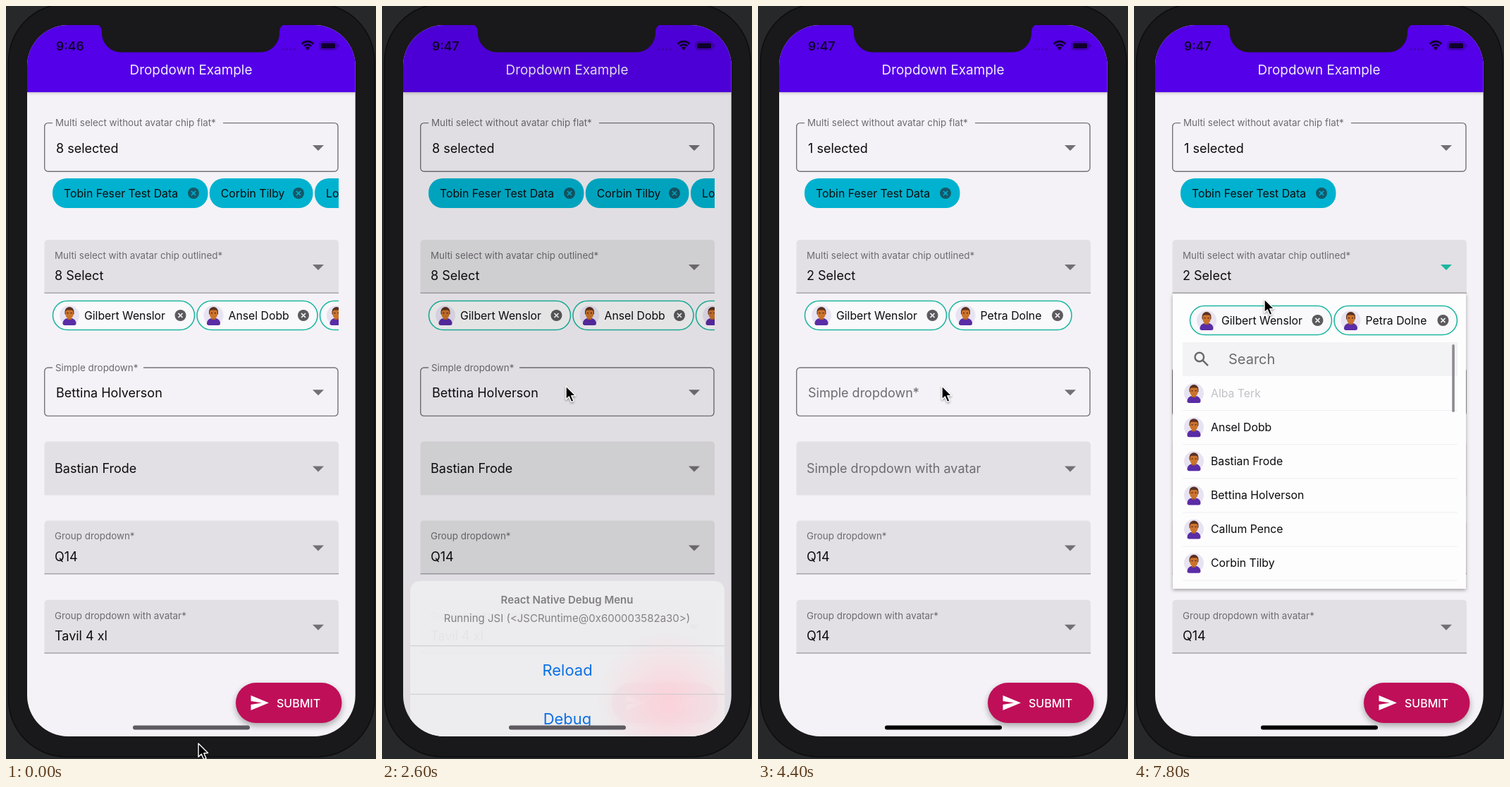
Recreate the animation shown at these times as an HTML page with a canvas. Size 525x1066 px, loop 8000 ms.

```html
<!DOCTYPE html>
<html lang="en">
<head>
<meta charset="utf-8">
<title>Dropdown Example</title>
<style>
html, body { margin: 0; width: 100%; height: 100%; overflow: hidden; background: #1f2022; }
canvas { display: block; width: 525px; height: 1066px; }
</style>
</head>
<body>
<canvas id="stage"></canvas>
<script>
const W = 525, H = 1066, LOOP = 8000, STEP = 200;
const canvas = document.getElementById('stage');
const ratio = window.devicePixelRatio || 1;
canvas.width = W * ratio;
canvas.height = H * ratio;
const c = canvas.getContext('2d');

const INK = '#0c0b0d', MUTED = '#6d6b70', FIELD = '#e2e0e4', PAGE = '#f4f2f6';
const TEAL = '#1db7a1', CYAN = '#00b2cf', BLUE = '#0a70e6', PURPLE = '#5400e8';
const PEOPLE = ['Alba Terk', 'Ansel Dobb', 'Bastian Frode', 'Bettina Holverson', 'Callum Pence', 'Corbin Tilby'];
const ACTIONS = ['Reload', 'Debug', 'Show Inspector', 'Disable Fast Refresh', 'Configure Bundler', 'Show Perf Monitor'];

// Each key: [time, value, value...]
const POINTER = [[0, 273, 1044], [1200, 273, 1044], [1400, 274, 994], [1800, 274, 757], [2200, 261, 538],
  [5400, 261, 538], [6200, 199, 490], [6600, 199, 490], [7400, 185, 376], [7600, 185, 376], [7800, 185, 415]];
const SHEET = [[1200, 640], [1400, 421], [1600, 40], [1800, 0], [2400, 0], [2600, 400], [2800, 640]];

function track(keys, t) {
  let i = keys.findIndex(k => k[0] > t);
  if (i === 0) return keys[0].slice(1);
  if (i < 0) return keys[keys.length - 1].slice(1);
  const a = keys[i - 1], b = keys[i], p = (t - a[0]) / (b[0] - a[0]);
  return a.slice(1).map((v, n) => v + (b[n + 1] - v) * p);
}

function box(x, y, w, h, r, fill, stroke, line = 1.4) {
  c.beginPath();
  c.roundRect(x, y, w, h, r);
  if (fill) { c.fillStyle = fill; c.fill(); }
  if (stroke) { c.strokeStyle = stroke; c.lineWidth = line; c.stroke(); }
}

function rect(x, y, w, h, fill) {
  c.fillStyle = fill;
  c.fillRect(x, y, w, h);
}

function disc(x, y, r, fill) {
  c.fillStyle = fill;
  c.beginPath();
  c.arc(x, y, r, 0, Math.PI * 2);
  c.fill();
}

function poly(points, fill) {
  c.beginPath();
  points.forEach(([x, y]) => c.lineTo(x, y));
  c.closePath();
  c.fillStyle = fill;
  c.fill();
}

// y is the middle of the capitals
function text(s, x, y, size, color = INK, weight = 400, align = 'left') {
  c.font = `${weight} ${size}px Inter, sans-serif`;
  c.textAlign = align;
  c.fillStyle = color;
  c.fillText(s, x, y + size * 0.36);
}

function shadow(color, blur, y, draw) {
  c.save();
  c.shadowColor = color;
  c.shadowBlur = blur * ratio;
  c.shadowOffsetY = y * ratio;
  draw();
  c.restore();
}

function clipped(x, y, w, h, r, draw) {
  c.save();
  c.beginPath();
  c.roundRect(x, y, w, h, r);
  c.clip();
  draw();
  c.restore();
}

function caret(y, color = '#727075') {
  poly([[435, y - 4], [451, y - 4], [443, y + 4]], color);
}

function cross(x, y, fill, mark) {
  disc(x, y, 8, fill);
  c.strokeStyle = mark;
  c.lineWidth = 1.7;
  c.beginPath();
  c.moveTo(x - 3, y - 3); c.lineTo(x + 3, y + 3);
  c.moveTo(x + 3, y - 3); c.lineTo(x - 3, y + 3);
  c.stroke();
}

function avatar(x, y) {
  disc(x, y, 14, '#e7e3f1');
  box(x - 9.5, y + 4, 19, 10, [8, 8, 3, 3], '#5a2ca6');
  rect(x - 3, y, 6, 6, '#b35f22');
  box(x - 6.5, y - 12, 13, 11, [7, 7, 2, 2], '#5a3022');
  box(x - 5.5, y - 7.5, 11, 12, [3, 3, 6, 6], '#cb732c');
  rect(x - 3.5, y - 4, 2, 1.3, '#4b2618');
  rect(x + 1.5, y - 4, 2, 1.3, '#4b2618');
}

function flatChip(x, w, name) {
  box(x, 244, w, 42, 20, CYAN);
  text(name, x + 16, 265, 15.8);
  cross(x + w - 20.5, 265, '#13596a', CYAN);
}

function lineChip(x, y, w, name) {
  box(x, y - 20.5, w, 41, 20.5, '#f9f8fa', TEAL, 1.6);
  avatar(x + 23.5, y);
  text(name, x + 44.5, y, 15.8);
  cross(x + w - 20, y, '#5c5a5e', '#f9f8fa');
}

function outlined(y, h, label, value, gap, caretColor) {
  box(54.7, y, 416.3, h, 5, null, '#757378');
  if (value) {
    rect(66, y - 2, gap, 4, PAGE);
    text(label, 70, y, 13.4, MUTED);
  }
  text(value || label, 71, y + h / 2 + 1.5, 18, value ? INK : MUTED);
  caret(y + h / 2 + 1, caretColor);
}

function filled(y, label, value, caretColor) {
  box(54.5, y, 417.5, 76, [5, 5, 0, 0], FIELD);
  if (label) {
    rect(54.5, y + 74.6, 417.5, 1.4, '#a4a2a7');
    text(label, 69, y + 22, 13.4, MUTED);
    text(value, 69, y + 51, 18);
  }
  caret(y + 39, caretColor);
}

function statusBar(late) {
  const ink = '#10002e';
  text(late ? '9:47' : '9:46', 71, 57, 17.5, ink, 600);
  for (let i = 0; i < 4; i++) rect(392 + i * 5.2, 60.5, 2.6, 1.6, '#3a009f');
  c.strokeStyle = ink;
  c.lineWidth = 2.8;
  for (const r of [7.4, 11.8]) {
    c.beginPath();
    c.arc(428, 62, r, -Math.PI * 0.75, -Math.PI * 0.25);
    c.stroke();
  }
  poly([[428, 63], [424.6, 58.8], [428, 57.4], [431.4, 58.8]], ink);
  box(445, 50.6, 24, 11.4, 3.5, null, '#35008e', 1);
  box(446.8, 52.4, 20.4, 7.8, 2, ink);
  rect(470.3, 54.3, 1.4, 4, '#35008e');
}

function submit() {
  shadow('rgba(0,0,0,.32)', 9, 4, () => box(326, 958, 150.5, 57, 28.5, '#bf0f58'));
  poly([[347.5, 976], [373, 986.5], [347.5, 997], [347.5, 989], [363, 986.5], [347.5, 984]], '#fff');
  text('SUBMIT', 384, 987, 16, '#fff', 500);
}

function form(reset, openSimple, openMulti) {
  outlined(165.6, 68.6, 'Multi select without avatar chip flat*', reset ? '1 selected' : '8 selected', 242);
  filled(331, 'Multi select with avatar chip outlined*', reset ? '2 Select' : '8 Select', openMulti ? TEAL : undefined);
  clipped(54, 240, 418, 230, 0, () => {
    flatChip(66, 220.5, 'Tobin Feser Test Data');
    lineChip(66.5, 438, 201, 'Gilbert Wenslor');
    if (reset) {
      lineChip(271, 438, 174, 'Petra Dolne');
    } else {
      flatChip(288.8, 146.7, PEOPLE[5]);
      flatChip(438, 150, 'Lorna');
      lineChip(271, 438, 171, PEOPLE[1]);
      lineChip(445.5, 438, 170, 'Lorna');
    }
  });
  outlined(512, 68.4, 'Simple dropdown*', reset ? '' : PEOPLE[3], 129, openSimple ? '#4a2ff0' : undefined);
  filled(616.5);
  text(reset ? 'Simple dropdown with avatar' : PEOPLE[2], 69, 655, 18, reset ? MUTED : INK);
  filled(728.5, 'Group dropdown*', 'Q14');
  filled(840.7, 'Group dropdown with avatar*', reset ? 'Q14' : 'Tavil 4 xl');
  submit();
}

function list(top, bottom, searchY, withAvatar, barHeight) {
  shadow('rgba(0,0,0,.35)', 5, 2, () => rect(55, top, 416, bottom - top, '#fefdfe'));
  if (withAvatar) {
    lineChip(79.5, 445, 201, 'Gilbert Wenslor');
    lineChip(284, 445, 174.5, 'Petra Dolne');
  }
  rect(69, searchY - 24, 390, 48, '#f3f2f4');
  c.strokeStyle = '#69676c';
  c.lineWidth = 2.4;
  c.beginPath();
  c.arc(92.8, searchY - 3, 6.3, 0, Math.PI * 2);
  c.moveTo(97.5, searchY + 1.7);
  c.lineTo(105, searchY + 9.2);
  c.stroke();
  text('Search', 134, searchY, 20, MUTED);
  const rows = withAvatar ? 6 : 5;
  for (let i = 0; i < rows; i++) {
    const y = searchY + 48 + i * 48.15;
    if (withAvatar) avatar(85, y);
    const color = i ? INK : withAvatar ? '#c3c1c5' : '#7b797e';
    text(PEOPLE[i], withAvatar ? 109 : 73.5, y, 15.8, color);
    if (withAvatar || i < rows - 1) rect(69, y + 24, 390, 1, '#eeedf0');
  }
  box(451.3, searchY - 21, 3.6, barHeight, 1.8, '#8d8b90');
}

function openList(t, from, to, draw) {
  if (t < from || t >= to) return;
  c.save();
  if (t < from + STEP) {
    c.globalAlpha = 0.8;
    c.translate(0, 37);
  }
  draw();
  c.restore();
}

function actionSheet(off) {
  rect(30, 27, 466, 1008, `rgba(0,0,0,${0.22 * (1 - off / 640)})`);
  const top = 414 + off;
  clipped(40, top, 446, 502, 14, () => {
    rect(40, top, 446, 502, 'rgba(238,237,239,.96)');
    if (off > 0) {
      const glow = c.createRadialGradient(405, 985, 10, 405, 985, 100);
      glow.addColorStop(0, 'rgba(255,205,214,.75)');
      glow.addColorStop(1, 'rgba(255,215,222,0)');
      c.globalAlpha = Math.min(1, off / 400);
      rect(40, top, 446, 502, glow);
      c.globalAlpha = 1;
    }
    text('React Native Debug Menu', 262.5, top + 26.5, 15, '#807e83', 600, 'center');
    text('Running JSI (<JSCRuntime@0x600003582a30>)', 262.5, top + 53, 15, '#838186', 400, 'center');
    ACTIONS.forEach((name, i) => {
      const y = top + 126.3 + i * 68.45;
      rect(40, y - 35, 446, 1, '#cbc9cd');
      text(name, 263, y, 22, BLUE, 400, 'center');
    });
  });
  box(40, top + 512, 446, 68, 14, '#fff');
  text('Cancel', 263, top + 546, 22, BLUE, 600, 'center');
}

function notch() {
  c.beginPath();
  c.moveTo(127, 26);
  c.quadraticCurveTo(136, 27, 136, 37);
  c.arcTo(136, 65.5, 164, 65.5, 27);
  c.arcTo(388, 65.5, 388, 37, 27);
  c.lineTo(388, 37);
  c.quadraticCurveTo(388, 27, 397, 26);
  c.closePath();
  c.fillStyle = '#19181a';
  c.fill();
}

function pointer([x, y]) {
  c.save();
  c.translate(x, y);
  shadow('rgba(0,0,0,.3)', 3, 1.5, () => {
    poly([[0, 0], [0, 19], [4.3, 15], [7.6, 22.6], [11, 21.1], [7.8, 13.8], [13.6, 13.6]], '#000');
    c.lineJoin = 'round';
    c.strokeStyle = '#fff';
    c.lineWidth = 1.4;
    c.stroke();
  });
  c.restore();
}

function draw(t) {
  const reset = t >= 3600;
  const simple = t >= 5400 && t < 6600, multi = t >= 7600;
  c.setTransform(ratio, 0, 0, ratio, 0, 0);
  rect(0, 0, W, H, '#26282a');
  box(3.5, -3, 519.5, 1066, 82, '#19181a', '#0d0d0f', 1.5);
  clipped(30, 27, 465.7, 1007, 58, () => {
    rect(30, 27, 466, 1008, PAGE);
    shadow('rgba(0,0,0,.25)', 4, 1, () => rect(30, 27, 466, 95, PURPLE));
    statusBar(t >= 2600);
    text('Dropdown Example', 262.5, 90, 18.9, '#f3edff', 400, 'center');
    form(reset, simple, multi);
    openList(t, 5400, 6600, () => list(581, 879, 612, false, 66));
    openList(t, 7600, LOOP, () => list(407, 825, 500, true, 96));
    const [off] = track(SHEET, t);
    if (off < 640) actionSheet(off);
    box(180, 1018.6, 166, 5.8, 2.9, reset ? '#000' : '#5d5b60');
  });
  notch();
  pointer(track(POINTER, t));
}

function tick() {
  const t = performance.now() % LOOP;
  draw(Math.floor(t / STEP) * STEP);
  requestAnimationFrame(tick);
}
tick();
</script>
</body>
</html>
```
